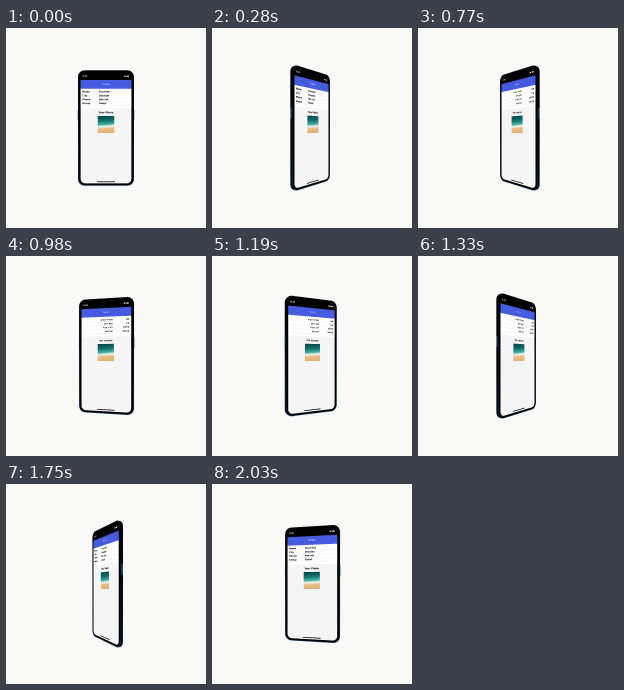
An HTML page with a canvas for the animation above (2100 ms loop, 200 by 200 pixels).

```html
<!DOCTYPE html>
<html lang="en">
<head>
<meta charset="utf-8">
<title>Turning phone</title>
<style>
html, body { margin: 0; width: 100%; height: 100%; overflow: hidden; background: #f9f9f7; }
canvas { display: block; width: 200px; height: 200px; }
</style>
</head>
<body>
<canvas id="stage" width="200" height="200"></canvas>
<script>
const STEP = 70, STEPS = 30;
const SS = 4;                 // supersampling of the scene
const FS = 8;                 // face texture pixels per unit
const HW = 27.75, HH = 57.25, RADIUS = 6.5;
const DEPTH = 2.8, EYE = 205;
const FONT = '"DejaVu Sans", sans-serif';

function makeCanvas(w, h) {
  const c = document.createElement('canvas');
  c.width = w;
  c.height = h;
  return c;
}

const PAGES = [
  {
    rtl: false, title: 'Profile', caption: 'Your Photo',
    rows: [['Name', 'Traveller'], ['City', 'Seaside'], ['Phone', 'Not set'], ['Group', 'Guest']]
  },
  {
    rtl: true, title: 'פרופיל', caption: 'התמונה שלי',
    rows: [['שם', 'מטייל אורח'], ['עיר', 'חוף הים'], ['טלפון', 'לא הוגדר'], ['קבוצה', 'אורחים']]
  }
];

function drawFace(page) {
  const c = makeCanvas(HW * 2 * FS, HH * 2 * FS);
  const g = c.getContext('2d');
  g.scale(FS, FS);
  g.translate(HW, HH);

  const rect = (x, y, w, h, fill) => {
    g.fillStyle = fill;
    g.fillRect(x, y, w, h);
  };
  const round = (x, y, w, h, r) => {
    g.beginPath();
    g.roundRect(x, y, w, h, r);
  };
  const text = (s, x, y, size, color, align, weight = '') => {
    g.font = `${weight} ${size}px ${FONT}`;
    g.fillStyle = color;
    g.textAlign = align;
    g.direction = page.rtl ? 'rtl' : 'ltr';
    g.textBaseline = 'middle';
    g.fillText(s, x, y);
  };

  // body and rim
  round(-HW, -HH, HW * 2, HH * 2, RADIUS);
  g.fillStyle = '#000000';
  g.fill();
  const rim = g.createLinearGradient(0, -HH, 0, HH);
  rim.addColorStop(0, '#05090d');
  rim.addColorStop(0.3, '#0a1c2c');
  rim.addColorStop(1, '#1d5c9c');
  g.strokeStyle = rim;
  g.lineWidth = 0.9;
  g.stroke();

  // screen
  g.save();
  round(-25.2, -54, 50.4, 109, 4.5);
  g.clip();
  rect(-26, -54, 52, 110, '#f5f5f5');
  rect(-26, -54, 52, 6.4, '#000000');
  rect(-26, -47.6, 52, 8.6, '#465cdf');
  rect(-26, -39, 52, 19.5, '#ffffff');
  text('9:41', -20.8, -51.4, 2, '#ffffff', 'center', 'bold');
  rect(18, -52, 1.6, 1.1, '#ffffff');
  rect(20.4, -52, 2.4, 1.1, '#ffffff');
  text(page.title, 0, -43.4, 2.3, '#ffffff', 'center');

  const side = page.rtl ? -1 : 1;
  const align = page.rtl ? 'right' : 'left';
  page.rows.forEach(([label, value], i) => {
    const y = -35.8 + i * 3.8;
    text(label, -23.5 * side, y, 2.3, '#000000', align, 'bold');
    text(value, -7 * side, y, 2.3, '#000000', align, 'bold');
    rect(-23, y + 1.9, 46, 0.2, '#e4e4e6');
  });

  text(page.caption, 0, -15.2, 2.4, '#000000', 'center', 'bold');

  // soft beach picture
  const sea = g.createLinearGradient(-0.6, -12, 0.6, 5);
  sea.addColorStop(0, '#06484d');
  sea.addColorStop(0.28, '#15746f');
  sea.addColorStop(0.5, '#4db3a5');
  sea.addColorStop(0.6, '#f1f5ef');
  sea.addColorStop(0.67, '#ecdcc0');
  sea.addColorStop(0.74, '#e8be86');
  sea.addColorStop(1, '#e5b174');
  rect(-8.2, -12, 16.4, 17, sea);

  g.restore();
  round(-9, 53, 18, 0.8, 0.4);
  g.fillStyle = '#111111';
  g.fill();
  return c;
}

const faces = PAGES.map(drawFace);
const scene = makeCanvas(200 * SS, 200 * SS);
const sg = scene.getContext('2d');
const out = document.getElementById('stage').getContext('2d');
out.imageSmoothingQuality = 'high';

function project(u, v, z, cos, sin) {
  const k = EYE / (EYE + u * sin - z * cos);
  return [(u * cos + z * sin) * k, v * k];
}

function outline(z, cos, sin) {
  sg.beginPath();
  [[1, 1], [-1, 1], [-1, -1], [1, -1]].forEach(([sx, sy], q) => {
    for (let i = 0; i <= 10; i++) {
      const t = (q + i / 10) * Math.PI / 2;
      const u = sx * (HW - RADIUS) + RADIUS * Math.cos(t);
      const v = sy * (HH - RADIUS) + RADIUS * Math.sin(t);
      // arc offsets already carry their quadrant's sign
      sg.lineTo(...project(u, v, z, cos, sin));
    }
  });
  sg.closePath();
}

function drawButton(side, cos, sin) {
  const top = -18, bottom = -8, rise = 0.5, thick = 0.6;
  const strip = (u1, z1, u2, z2) => {
    const at = (u, v, z) => project(side * u, v, z, cos, sin);
    sg.beginPath();
    sg.moveTo(...at(u1, top, z1));
    sg.lineTo(...at(u2, top, z2));
    sg.lineTo(...at(u2, bottom, z2));
    sg.lineTo(...at(u1, bottom, z1));
    sg.fill();
  };
  sg.fillStyle = '#2a648c';
  strip(HW, 0, HW + rise, 0);
  strip(HW + rise, -thick, HW + rise, thick);
}

function drawBody(cos, sin) {
  const edge = sg.createLinearGradient(0, -HH, 0, HH);
  edge.addColorStop(0, '#081016');
  edge.addColorStop(0.6, '#0a1d2b');
  edge.addColorStop(1, '#164a75');
  const layers = 16;
  for (let i = 0; i <= layers; i++) {
    outline((i / layers - 0.5) * DEPTH, cos, sin);
    sg.fillStyle = i < 3 ? edge : '#020508';
    sg.fill();
  }
  drawButton(-1, cos, sin);
  drawButton(1, cos, sin);
}

// Each scene column maps to one vertical slice of the face.
function drawSlices(face, cos, sin) {
  const z = DEPTH / 2;
  const toU = x => (x * (EYE - z * cos) - EYE * z * sin) / (EYE * cos - x * sin);
  sg.save();
  outline(z, cos, sin);
  sg.clip();
  const left = Math.floor(project(-HW, 0, z, cos, sin)[0] * SS);
  const right = Math.ceil(project(HW, 0, z, cos, sin)[0] * SS);
  for (let x = left; x < right; x++) {
    const a = Math.max(-HW, toU(x / SS));
    const b = Math.min(HW, toU((x + 1) / SS));
    if (b <= a) continue;
    const k = EYE / (EYE + (a + b) / 2 * sin - z * cos);
    sg.drawImage(face, (a + HW) * FS, 0, (b - a) * FS, face.height,
      x / SS, -HH * k, 1 / SS, HH * 2 * k);
  }
  sg.restore();
}

function draw(step) {
  const turn = step * 360 / STEPS;
  const back = turn > 90 && turn < 270;
  const angle = (turn - (back ? 180 : 0)) * Math.PI / 180;
  const cos = Math.cos(angle), sin = Math.sin(angle);

  sg.setTransform(1, 0, 0, 1, 0, 0);
  sg.fillStyle = '#f9f9f7';
  sg.fillRect(0, 0, scene.width, scene.height);
  sg.setTransform(SS, 0, 0, SS, 100 * SS, 100 * SS);
  drawBody(cos, sin);
  drawSlices(faces[back ? 1 : 0], cos, sin);
  out.drawImage(scene, 0, 0, 200, 200);
}

let start = null, last = -1;
function tick(now) {
  if (start === null) start = now;
  const step = Math.floor(Math.max(0, now - start) / STEP) % STEPS;
  if (step !== last) draw(last = step);
  requestAnimationFrame(tick);
}
draw(0);
requestAnimationFrame(tick);
</script>
</body>
</html>
```
